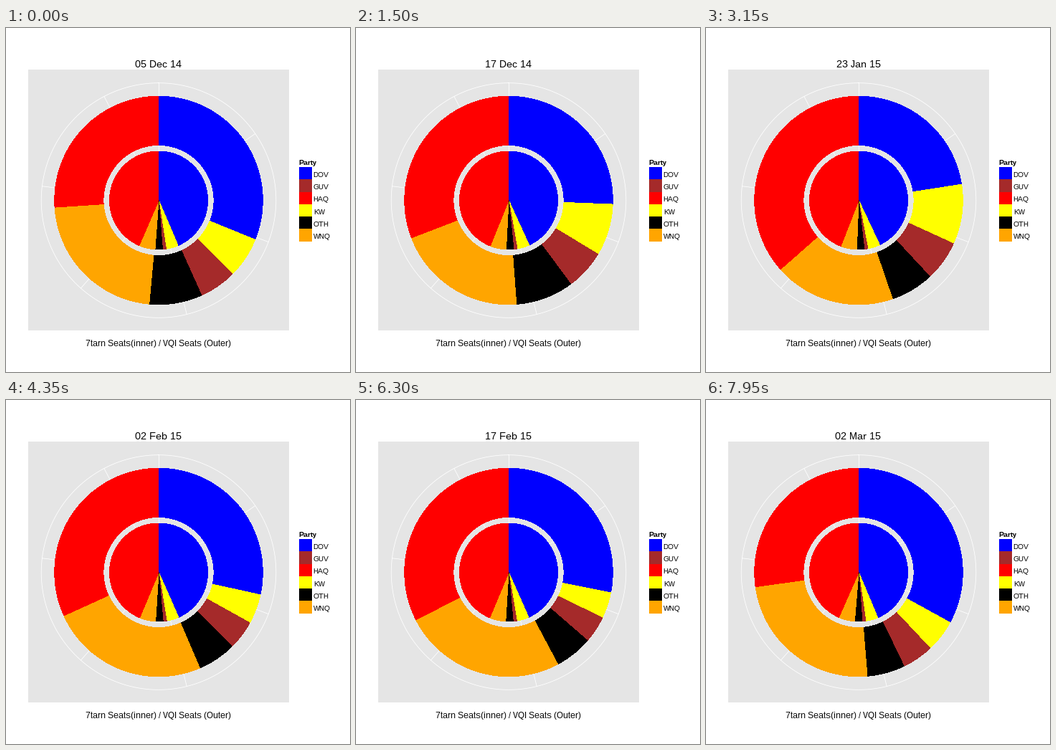
Recreate the animation shown at these times as a matplotlib script. Size 480 by 480 pixels, loop 8 s.

```python
import numpy as np
import matplotlib.pyplot as plt
from matplotlib.animation import FuncAnimation
from matplotlib.patches import Polygon, Rectangle

SIZE, DPI = 480, 96
PX = 72 / DPI
CX, CY = 213, 240.5
R_IN, R_GAP, R_OUT, R_GRID = 68.5, 77.1, 145.2, 163.8
TICK, HOLD, STEPS = 50, 3, 54

plt.rcParams.update({"font.family": "Liberation Sans",
                     "text.hinting": "native", "text.hinting_factor": 1})

LEGEND = [("DOV", "#0000ff"), ("GUV", "#a52a2a"), ("HAQ", "#ff0000"),
          ("KW", "#ffff00"), ("OTH", "#000000"), ("WNQ", "#ffa500")]
SLICES = ["#0000ff", "#ffff00", "#a52a2a", "#000000", "#ffa500", "#ff0000"]

# The blue and yellow widths (degrees) swing; the other slices follow them.
TURNS = [0, 10, 21, 29, 36, 42, 53]
BLUE = [112.2, 92.2, 81.2, 102.5, 120.8, 101.3, 118.8]
YELLOW = [22.7, 28.9, 33.4, 16.5, 25.5, 14.6, 18.0]


def outer_edges(step):
    blue = np.interp(step, TURNS, BLUE)
    yellow = np.interp(step, TURNS, YELLOW)
    brown = min(22.4, 4.5 + 0.72 * yellow)
    black = 21 + 12 * np.exp(-((step - 7) / 12) ** 2)
    orange = 109.3 - 1.25 * yellow
    return [0, *np.cumsum([blue, yellow, brown, black, orange]), 360]


def inner_edges(step):
    sway = 0.065 * np.interp(step, TURNS, BLUE)
    return [0, *(sway + np.array([149.5, 164, 168.2, 177, 196.1])), 360]


def make_dates():
    """Every day but Sundays, with a winter break."""
    spans = [("2014-12-05", "2014-12-21"), ("2015-01-15", "2015-03-03")]
    days = np.concatenate([np.arange(a, b, dtype="datetime64[D]") for a, b in spans])
    days = days[np.is_busday(days, weekmask="1111110")]
    return [d.item().strftime("%d %b %y") for d in days]


def polar(r, deg):
    a = np.radians(deg)
    return np.column_stack([CX + r * np.sin(a), CY - r * np.cos(a)])


def ring_slice(r0, r1, start, end):
    arc = np.linspace(start, end, 90)
    return np.vstack([polar(r1, arc), polar(r0, arc[::-1])])


fig = plt.figure(figsize=(SIZE / DPI, SIZE / DPI), dpi=DPI, facecolor="white")
ax = fig.add_axes([0, 0, 1, 1])
ax.set_xlim(0, SIZE)
ax.set_ylim(SIZE, 0)
ax.axis("off")


def label(x, y, text, size, **kw):
    return ax.text(x, y, text, fontsize=size * PX, va="baseline", **kw)


def box(x, y, w, h, color):
    ax.add_patch(Rectangle((x, y), w, h, fc=color, lw=0, antialiased=False))


def line(points):
    ax.plot(*points.T, color="white", lw=0.8 * PX, zorder=1.5)


def add_slices():
    return [ax.add_patch(Polygon([(CX, CY)] * 3, fc=c, lw=0, antialiased=False, zorder=2))
            for c in SLICES]


box(31, 58, 364, 364, "#e5e5e5")
line(polar(R_GRID, np.linspace(0, 360, 361)))
for seats in range(0, 650, 100):
    line(polar(np.array([0, R_GRID]), seats * 360 / 650))

dates = make_dates()
title = label(212.5, 55, dates[0], 14.4, ha="center")
label(212.8, 444, "7tarn Seats(inner) / VQI Seats (Outer)", 12, ha="center")
label(408.6, 191, "Party", 10, weight="bold")
for k, (name, color) in enumerate(LEGEND):
    top = 194 + 17.28 * k
    box(409, round(top), 18, 18, color)
    label(428.7, top + 13.7, name, 10)

rings = [(add_slices(), outer_edges, R_GAP, R_OUT),
         (add_slices(), inner_edges, 0, R_IN)]


def draw(i):
    step = min(i // HOLD, STEPS - 1)
    title.set_text(dates[step])
    for patches, edges, r0, r1 in rings:
        cuts = edges(step)
        for patch, a, b in zip(patches, cuts, cuts[1:]):
            patch.set_xy(ring_slice(r0, r1, a, b))
    return [title]


anim = FuncAnimation(fig, draw, frames=8000 // TICK, interval=TICK,
                     repeat=True, repeat_delay=0)
plt.show()
```
